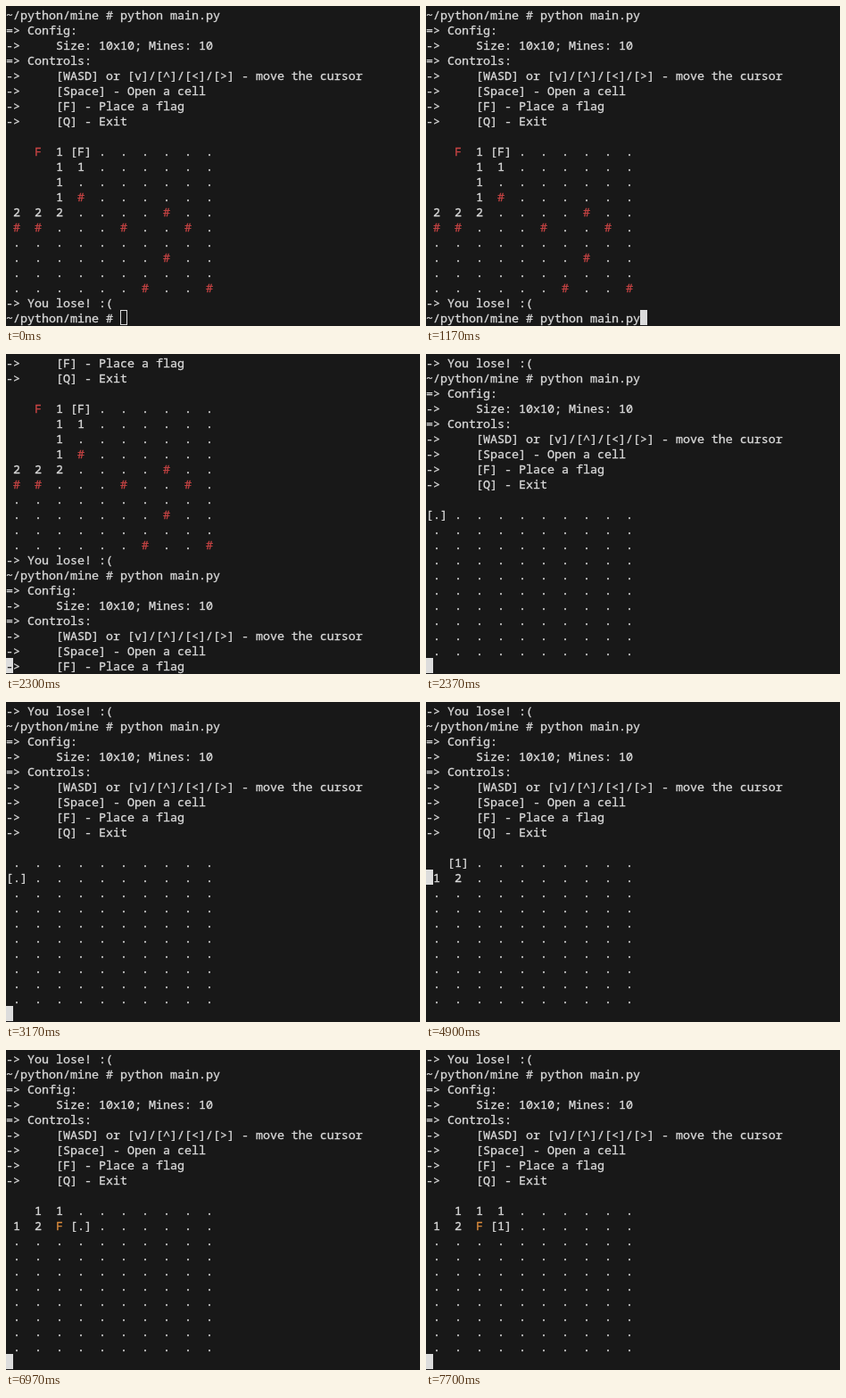
These frames come from a looping animation (464x359 px, 8 s). An HTML page:

```html
<!DOCTYPE html>
<html lang="en">
<head>
<meta charset="utf-8">
<title>Terminal minesweeper</title>
<style>
  html, body { margin: 0; width: 100%; height: 100%; overflow: hidden; background: #181818; }
  svg { display: block; width: 464px; height: 359px; }
  text {
    font: 13.3333px "Noto Sans Mono", "DejaVu Sans Mono", monospace;
    white-space: pre;
  }
  /* a thin outline gives the glyphs their full terminal weight */
  text, tspan { fill: currentColor; stroke: currentColor; stroke-width: 0.3px; }
  text { color: #dadada; }
  .red { color: #c84444; }
  .flag { color: #dc8c3c; }
  .under { color: #181818; }
  .block { fill: #dcdcdc; }
  .hollow { fill: none; stroke: #dcdcdc; }
</style>
</head>
<body>
<svg viewBox="0 0 464 359">
  <g id="rows"></g>
  <rect id="cursor"/>
  <text id="under" class="under"></text>
</svg>
<script>
const LOOP = 8000, COL = 8, ROW = 17, LINES = 21, SIZE = 10;
const $ = id => document.getElementById(id);
const svgEl = name => document.createElementNS('http://www.w3.org/2000/svg', name);
const esc = s => s.replace(/</g, '&lt;').replace(/>/g, '&gt;');
const tint = (cls, s) => `<tspan class="${cls}">${s}</tspan>`;

const PROMPT = '~/python/mine # ', CMD = 'python main.py';
const help = [
  '=> Config:',
  '->     Size: 10x10; Mines: 10',
  '=> Controls:',
  '->     [WASD] or [v]/[^]/[<]/[>] - move the cursor',
  '->     [Space] - Open a cell',
  '->     [F] - Place a flag',
  '->     [Q] - Exit',
  ''
].map(esc);

// m: revealed mine, x: flagged mine, f: flag
const glyphs = { m: tint('red', '#'), x: tint('red', 'F'), f: tint('flag', 'F') };
const blank = '.'.repeat(SIZE);
const lost = [
  ' x1F......', '  11......', '  1.......', '  1m......', '222....m..',
  'mm...m..m.', blank, '.......m..', blank, '......m..m'
];

function board(grid, [sx, sy]) {
  return grid.map((line, y) => [...line].map((c, x) => {
    const g = glyphs[c] || c;
    return x === sx && y === sy ? `[${g}]` : ` ${g} `;
  }).join(''));
}

const home = [0, 20], redraw = [0, 11];

// Each step changes only the listed parts of the state.
const steps = [
  [0, { scroll: 0, cmd: '', hollow: true, cur: [16, 20], open: ['', ''], sel: [0, 0] }],
  [500, { hollow: false }],
  [1170, { cmd: CMD, cur: [30, 20] }],
  [1440, { cmd: 'cat readme.txt' }],
  [1840, { cmd: CMD }],
  [2300, { scroll: 6, cur: home }],
  [2370, { scroll: 19 }],
  [3170, { sel: [0, 1] }],
  [3440, { sel: [0, 0] }],
  [4240, { open: [' 1', '12'] }],
  [4900, { sel: [1, 0], cur: redraw }],
  [4970, { cur: home }],
  [5100, { sel: [2, 0] }],
  [5440, { open: [' 11', '12'] }],
  [6040, { sel: [2, 1] }],
  [6700, { cur: redraw }],
  [6770, { open: [' 11', '12f'], cur: home }],
  [6970, { sel: [3, 1] }],
  [7170, { sel: [3, 0] }],
  [7370, { open: [' 111', '12f'] }],
  [7570, { sel: [3, 1] }],
  [7700, { open: [' 111', '12f1'] }]
];
let state = {};
const states = steps.map(([, change]) => state = { ...state, ...change });

const rows = Array.from({ length: LINES }, (_, i) => {
  const row = svgEl('text');
  row.setAttribute('y', 15 + ROW * i);
  return $('rows').appendChild(row);
});

function place(el, x, y) {
  el.setAttribute('x', x);
  el.setAttribute('y', y);
}

function draw(s) {
  const grid = Array.from({ length: SIZE }, (_, i) => (s.open[i] || '').padEnd(SIZE, '.'));
  const log = [
    PROMPT + CMD, ...help, ...board(lost, [3, 0]), esc('-> You lose! :('),
    PROMPT + s.cmd, ...help, ...board(grid, s.sel)
  ];
  rows.forEach((row, i) => row.innerHTML = log[s.scroll + i] || '');

  const [cx, cy] = s.cur, x = cx * COL, y = 1 + cy * ROW;
  const inset = s.hollow ? 0.5 : 0, cursor = $('cursor');
  place(cursor, x + inset, y + inset);
  cursor.setAttribute('width', COL - 2 * inset);
  cursor.setAttribute('height', ROW - 2 * inset);
  cursor.setAttribute('class', s.hollow ? 'hollow' : 'block');
  place($('under'), x, y + 14);
  $('under').textContent = rows[cy].textContent[cx] || '';
}

let shown = -1;
const start = performance.now();
function tick() {
  const t = (performance.now() - start) % LOOP;
  let i = steps.length - 1;
  while (steps[i][0] > t) i--;
  if (i !== shown) draw(states[shown = i]);
  requestAnimationFrame(tick);
}
tick();
</script>
</body>
</html>
```
